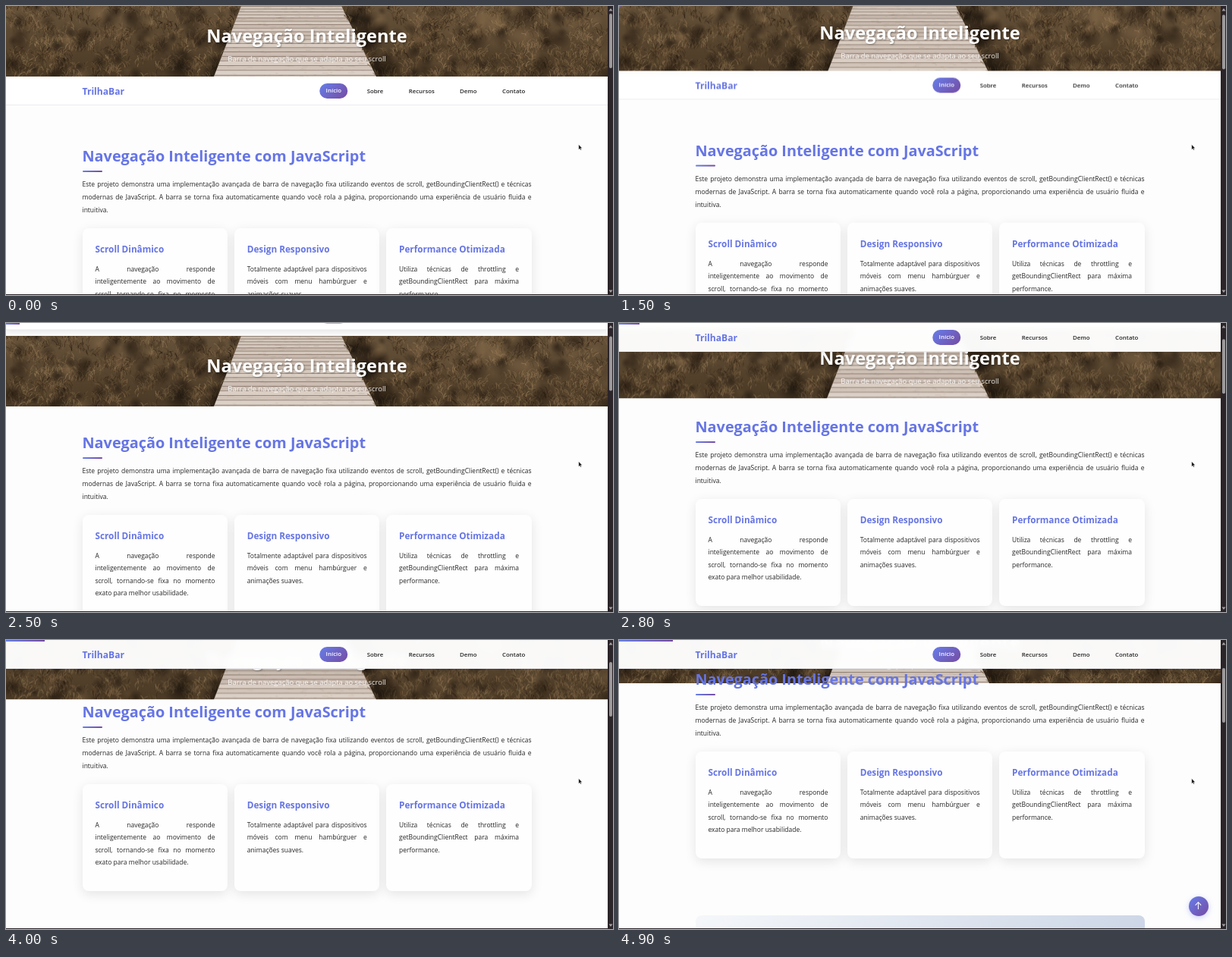
Animation of 800 by 381 pixels, one loop 5 s. Source, as an HTML page with a canvas:

```html
<!DOCTYPE html>
<html lang="pt-BR">
<head>
<meta charset="utf-8">
<title>Navegação Inteligente</title>
<style>
  :root { --a: #667eea; --b: #764ba2; --title: #6675e4; --grad: linear-gradient(135deg, var(--a), var(--b)); }
  * { box-sizing: border-box; }
  html, body { margin: 0; width: 100%; height: 100%; overflow: hidden; background: #fdfdfd; }
  body { font-family: "Open Sans", "Noto Sans", sans-serif; color: #262626; }
  #stage { position: absolute; left: 0; top: 0; width: 800px; height: 381px; overflow: hidden; }
  #stage div, #stage span, #stage canvas, #stage svg { position: absolute; white-space: nowrap; }
  #hero { left: 0; top: 0; width: 793px; height: 93px; color: #fff; text-align: center; overflow: hidden; }
  #hero canvas { left: 0; top: 0; }
  #hero div { left: 0; width: 793px; }
  .h1 { top: 22.5px; font: 700 23.6px/33px "Open Sans", "Noto Sans", sans-serif; text-shadow: 1px 1px 2px rgba(0,0,0,.3); }
  .sub { top: 62px; font-size: 9.43px; line-height: 16px; opacity: .9; }
  #page { left: 0; top: 0; width: 793px; height: 700px; }
  .h2 { left: 100.5px; top: 183px; font: 700 19.83px/30px "Open Sans", "Noto Sans", sans-serif; color: var(--title); }
  .rule { left: 100.5px; top: 217.4px; width: 26px; height: 2px; border-radius: 1px; background: linear-gradient(90deg, var(--a), var(--b)); }
  .text { font-size: 8.5px; line-height: 16.6px; }
  .text span { left: 0; width: 100%; text-align: justify; text-align-last: justify; }
  .text span:last-child { text-align-last: left; }
  .intro { left: 100.5px; top: 227.4px; width: 592px; }
  .card { top: 293px; width: 191.5px; height: 141px; border-radius: 8px; background: #fefefe;
    box-shadow: 0 4px 15px rgba(0,0,0,.1); }
  .card .name { left: 17px; top: 17.6px; font-size: 11.75px; font-weight: 700; line-height: 19px; color: var(--title); }
  .card .text { left: 17px; top: 45.6px; width: 158px; }
  .demo { left: 100.5px; top: 509px; width: 592px; height: 150px; border-radius: 8px;
    background: linear-gradient(135deg, #f5f7fa, #c3cfe2); }
  #nav { left: 0; top: 0; width: 793px; height: 37.5px; background: rgba(255,255,255,.97);
    backdrop-filter: blur(4px); border-bottom: 1px solid #ebebef; }
  #nav span { top: 9.5px; line-height: 19px; transform: translateX(-50%); font-size: 7.85px; font-weight: 600; }
  #nav .logo { left: 100.5px; transform: none; font-size: 12.1px; font-weight: 700; color: var(--title); }
  #nav .on { top: 9px; width: 37.5px; height: 19.5px; border-radius: 10px; text-align: center; color: #fff; background: var(--grad); }
  #bar { left: 0; top: 0; height: 2px; background: linear-gradient(90deg, var(--a), var(--b)); }
  #up { left: 750.5px; top: 337.5px; width: 26px; height: 26px; border-radius: 50%; color: #fff; background: var(--grad);
    text-align: center; font: 13px/25px Inter, "DejaVu Sans", sans-serif; box-shadow: 0 2px 7px rgba(102,126,234,.35); }
  .dark { background: #2b2428; }
  #thumb { left: 2px; top: 10px; width: 4px; height: 72px; border-radius: 2px; background: #9c999b; }
</style>
</head>
<body>
<div id="stage">
  <div id="hero">
    <canvas id="photo" width="793" height="93"></canvas>
    <div class="h1">Navegação Inteligente</div>
    <div class="sub">Barra de navegação que se adapta ao seu scroll</div>
  </div>
  <div id="page">
    <div class="h2">Navegação Inteligente com JavaScript</div>
    <div class="rule"></div>
    <div class="text intro">Este projeto demonstra uma implementação avançada de barra de navegação fixa utilizando eventos de scroll, getBoundingClientRect() e técnicas|modernas de JavaScript. A barra se torna fixa automaticamente quando você rola a página, proporcionando uma experiência de usuário fluida e|intuitiva.</div>
    <div class="card" style="left:100.5px">
      <div class="name">Scroll Dinâmico</div>
      <div class="text">A navegação responde|inteligentemente ao movimento de|scroll, tornando-se fixa no momento|exato para melhor usabilidade.</div>
    </div>
    <div class="card" style="left:300.7px">
      <div class="name">Design Responsivo</div>
      <div class="text">Totalmente adaptável para dispositivos|móveis com menu hambúrguer e|animações suaves.</div>
    </div>
    <div class="card" style="left:501px">
      <div class="name">Performance Otimizada</div>
      <div class="text">Utiliza técnicas de throttling e|getBoundingClientRect para máxima|performance.</div>
    </div>
    <div class="demo"></div>
  </div>
  <div id="nav">
    <span class="logo">TrilhaBar</span>
    <span class="on" style="left:431.8px">Início</span>
    <span style="left:486.5px">Sobre</span>
    <span style="left:547.8px">Recursos</span>
    <span style="left:609.3px">Demo</span>
    <span style="left:669.2px">Contato</span>
  </div>
  <div id="bar"></div>
  <div id="up">↑</div>
  <div class="dark" style="left:793px;top:0;width:7px;height:381px">
    <div id="thumb"></div>
    <svg width="7" height="381" fill="#a5a2a4"><path d="M1.5 6.5L4 3l2.5 3.5zM1.5 374.5h5L4 378z"/></svg>
  </div>
  <div class="dark" style="left:0;top:379.5px;width:800px;height:1.5px"></div>
  <svg style="left:754px;top:182px" width="7" height="10"><path d="M.8.8v6.4l1.5-1.3 1 2.2 1-.5-1-2.1h2z" fill="#111" stroke="#fff" stroke-width=".3"/></svg>
</div>
<script>
const LOOP = 5000, STEP = 100, NAV_H = 37, HERO_H = 93;
const FIX_AT = 2455, SLIDE = 300, UP_AT = 4560;
// [time, scroll offset]
const SCROLL = [[0, 0], [1270, 0], [1500, 7.5], [2200, 29], [2500, 40], [2800, 61],
  [3200, 88], [3350, 97], [3600, 103], [4250, 103], [4450, 115], [4750, 142], [4900, 146]];
const $ = id => document.getElementById(id);
const clamp = v => Math.max(0, Math.min(1, v));
const moveY = (id, y) => { $(id).style.transform = `translateY(${y}px)`; };

for (const el of document.querySelectorAll('.text')) {
  const lines = el.textContent.split('|');
  el.textContent = '';
  lines.forEach((line, i) => {
    const span = document.createElement('span');
    span.textContent = line;
    span.style.top = i * 16.6 + 'px';
    el.append(span);
  });
}

function scrollAt(t) {
  for (let i = 1; i < SCROLL.length; i++) {
    const [t0, s0] = SCROLL[i - 1], [t1, s1] = SCROLL[i];
    if (t <= t1) return s0 + (s1 - s0) * clamp((t - t0) / (t1 - t0));
  }
  return SCROLL[SCROLL.length - 1][1];
}

let seed = 11;
function rand(a = 0, b = 1) {
  seed = (seed * 1664525 + 1013904223) % 4294967296;
  return a + (b - a) * seed / 4294967296;
}

function paintPhoto() {
  const c = $('photo').getContext('2d');
  const W = 793, H = HERO_H;
  const base = c.createLinearGradient(0, 0, 0, H);
  base.addColorStop(0, '#66523a');
  base.addColorStop(1, '#4a3925');
  c.fillStyle = base;
  c.fillRect(0, 0, W, H);

  const shade = (x, y, r, rgb, alpha) => {
    const g = c.createRadialGradient(x, y, 0, x, y, r);
    g.addColorStop(0, `rgba(${rgb},${alpha})`);
    g.addColorStop(1, `rgba(${rgb},0)`);
    c.fillStyle = g;
    c.fillRect(x - r, y - r, 2 * r, 2 * r);
  };
  const blade = (x, y, len, lean, color) => {
    c.strokeStyle = color;
    c.lineWidth = rand(.4, 1.1);
    c.beginPath();
    c.moveTo(x, y);
    c.quadraticCurveTo(x + lean * .2, y - len * .7, x + lean, y - len * .8);
    c.stroke();
  };
  const tones = ['#281c11', '#3a2a1a', '#503d27', '#685138', '#7d6446', '#967b58', '#5d5233'];
  c.globalAlpha = .75;
  for (let i = 0; i < 420; i++) {
    const x = rand(0, W), y = rand(0, H + 10), warm = rand(0, 3);
    for (let k = 0; k < 22; k++) {
      const tone = tones[Math.floor(rand(0, 4) + warm)];
      blade(x + rand(-11, 11), y + rand(-5, 5), rand(3, 11), rand(-7, 7), tone);
    }
  }
  c.globalAlpha = 1;
  for (let i = 0; i < 150; i++) shade(rand(0, W), rand(0, H), rand(6, 17), '28,19,11', rand(.25, .6));
  for (let i = 0; i < 60; i++) shade(rand(0, W), rand(0, H), rand(6, 18), '165,132,92', rand(.1, .35));
  for (const [x, y] of [[230, 78], [283, 82], [292, 45], [492, 85], [474, 50], [458, 18]]) {
    shade(x, y, 24, '20,14,8', .8);
  }

  // Boardwalk in perspective
  c.save();
  c.beginPath();
  c.moveTo(310, 0);
  c.lineTo(442, 0);
  c.lineTo(488, H);
  c.lineTo(274, H);
  c.closePath();
  c.clip();
  const wood = c.createLinearGradient(0, 0, 0, H);
  wood.addColorStop(0, '#cdbfb3');
  wood.addColorStop(1, '#d9ccc2');
  c.fillStyle = wood;
  c.fillRect(270, 0, 225, H);
  for (let y = 0, gap = 3.6; y < H; y += gap, gap += .17) {
    c.fillStyle = `rgba(${rand() < .5 ? '255,248,240' : '120,95,80'},${rand(.05, .15)})`;
    c.fillRect(270, y, 225, gap);
    c.fillStyle = 'rgba(103,82,70,.6)';
    c.fillRect(270, y, 225, .9);
  }
  for (let i = 0; i < 300; i++) {
    c.fillStyle = `rgba(110,85,70,${rand(.06, .2)})`;
    c.fillRect(rand(276, 488), rand(0, H), rand(2, 9), .7);
  }
  c.restore();

  for (let i = 0; i < 80; i++) {
    const y = rand(4, H + 6), left = rand() < .5;
    const x = left ? 307 - y * .39 : 445 + y * .5;
    blade(x + rand(-5, 2), y, rand(3, 8), rand(-5, 4), tones[Math.floor(rand(0, 5))]);
  }
}

function draw(now) {
  const t = Math.floor(now % LOOP / STEP) * STEP;
  const s = scrollAt(t), fixed = t >= FIX_AT;
  const slide = 1 - Math.pow(1 - clamp((t - FIX_AT) / SLIDE), 1.6);
  moveY('page', -s);
  moveY('hero', (fixed ? NAV_H : 0) - s / 2);
  moveY('nav', fixed ? NAV_H * (slide - 1) : HERO_H - s);
  $('nav').style.boxShadow = fixed ? '0 2px 9px rgba(0,0,0,.1)' : 'none';
  moveY('thumb', s * .185);
  $('bar').style.width = scrollAt(t - 90) * .497 + 'px';
  $('up').style.opacity = clamp((t - UP_AT) / 300);
}

function tick() {
  draw(performance.now());
  requestAnimationFrame(tick);
}
paintPhoto();
tick();
</script>
</body>
</html>
```
